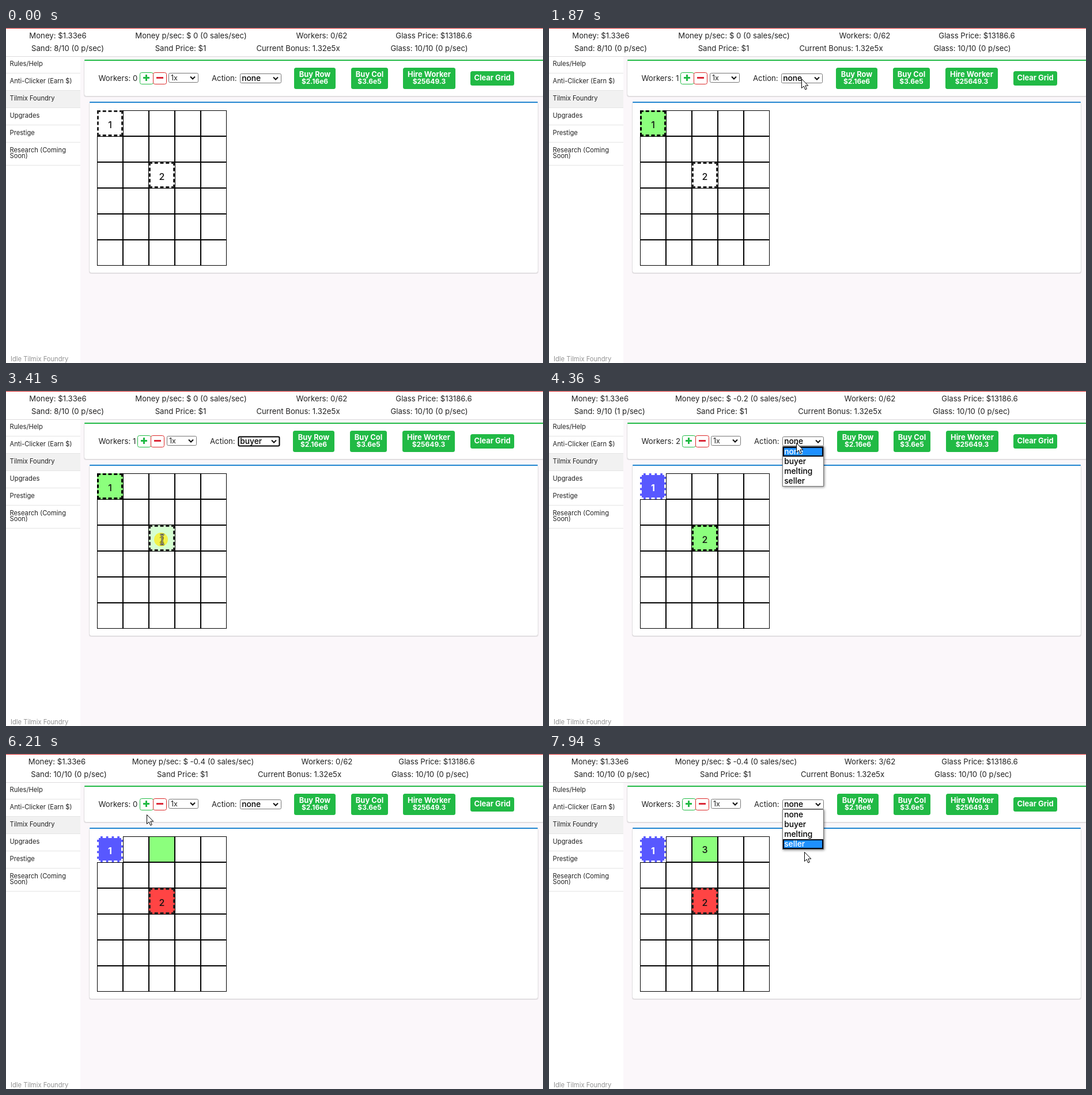
Animation of 932x582 px, one loop 8 s. Source, as an HTML page:

```html
<!DOCTYPE html>
<html lang="en">
<head>
<meta charset="utf-8">
<title>Idle Tilmix Foundry</title>
<style>
  html, body { margin: 0; width: 100%; height: 100%; overflow: hidden; background: #fbf7fa; }
  svg { position: absolute; left: 0; top: 0; }
  text { font-family: Inter, "Open Sans", sans-serif; font-size: 13.2px; fill: #222; white-space: pre; }
  .side { font-size: 11.2px; }
  .btn { font-weight: 700; fill: #fff; font-size: 12.9px; }
  .cost { font-size: 12px; }
  .option { font-weight: 500; font-size: 13.8px; fill: #000; }
  .cell {
    position: absolute; box-sizing: border-box; width: 45px; height: 45px;
    border: 1px solid #000; background: #fff; color: #111; text-align: center;
    font: 500 16px/44px Inter, "Open Sans", sans-serif;
  }
  .fixed { border: 3px dashed #222; line-height: 45px; }
  .hover { background: #d6ffd1; }
  .picked { background: #8cff7d; border-color: #000; }
  .buyer { background: #5858ff; border-color: #fff; color: #fff; font-weight: 700; }
  .melting { background: #ff4444; }
</style>
</head>
<body>
<svg id="page" width="932" height="582"></svg>
<div id="grid"></div>
<svg id="top" width="932" height="582"></svg>
<script>
const NS = 'http://www.w3.org/2000/svg';
const page = document.getElementById('page');
const topLayer = document.getElementById('top');
const gridBox = document.getElementById('grid');

function set(el, attrs) {
  for (const k in attrs) el.setAttribute(k, attrs[k]);
  return el;
}
function add(parent, tag, attrs) {
  return parent.appendChild(set(document.createElementNS(NS, tag), attrs));
}
const rect = (p, x, y, width, height, fill, more) =>
  add(p, 'rect', { x, y, width, height, fill, ...more });
const frame = (p, x, y, w, h, stroke, more) =>
  rect(p, x + .5, y + .5, w - 1, h - 1, '#fff', { stroke, ...more });
const path = (p, d, stroke, width, fill = 'none') =>
  add(p, 'path', { d, stroke, 'stroke-width': width, fill });
function text(p, str, x, y, more) {
  const el = add(p, 'text', { x, y, ...more });
  el.textContent = str;
  return el;
}
const mid = { 'text-anchor': 'middle' };
const move = (el, x, y = 0) => el.setAttribute('transform', `translate(${x} ${y})`);
const show = (el, on) => { el.style.display = on ? '' : 'none'; };
const write = (el, str) => { if (el.textContent !== str) el.textContent = str; };

// Value of the last [time, value] step reached.
function at(steps, t) {
  let v = steps[0][1];
  for (const s of steps) if (t >= s[0]) v = s[1];
  return v;
}

// ---- Fixed page parts ----
rect(page, 0, 0, 932, 582, '#fbf7fa');
rect(page, 0, 0, 129, 582, '#fff');
rect(page, 0, 0, 932, 49, '#fff');
rect(page, 0, 49, 932, 1, '#dcdadc');
rect(page, 0, 0, 932, 1, '#db2828');

rect(page, 0, 108, 129, 30, '#f1f1f1');
for (const y of [78, 108, 138, 168, 198, 238]) rect(page, 0, y, 129, 1, '#e4e4e4');
[['Rules/Help', 66], ['Anti-Clicker (Earn $)', 96], ['Tilmix Foundry', 126], ['Upgrades', 156],
 ['Prestige', 186], ['Research (Coming', 216], ['Soon)', 226]]
  .forEach(([s, y]) => text(page, s, 6.5, y, { class: 'side' }));
text(page, 'Idle Tilmix Foundry', 8, 579, { class: 'side', style: 'fill:#929292' });

function panel(x, y, w, h, color) {
  rect(page, x, y + 2, w, h - 1, '#e3dfe2', { rx: 4 });
  frame(page, x, y, w, h, '#dedcde', { rx: 4 });
  rect(page, x + 1, y, w - 2, 2, color, { rx: 1 });
}
panel(135, 55, 800, 64, '#21ba45');
panel(144, 128, 780, 298, '#2185d0');

// ---- Header counters ----
const rowA = ['Money: $1.33e6', '', '', 'Glass Price: $13186.6'].map(s => text(page, s, 0, 18, mid));
const rowB = ['', 'Sand Price: $1', 'Current Bonus: 1.32e5x', 'Glass: 10/10 (0 p/sec)']
  .map(s => text(page, s, 0, 40, mid));

// ---- Toolbar ----
const label = text(page, '', 160.5, 92);

function chevron(p, x, y) {
  path(p, `M${x - 4} ${y - 2}l4 4l4 -4`, '#111', 2);
}
const plusMinus = add(page, 'g', {});
frame(plusMinus, 0, 77, 24, 21, '#21ba45', { rx: 3 });
frame(plusMinus, 23, 77, 24, 21, '#db2828', { rx: 3 });
path(plusMinus, 'M6 86.5h11M11.5 81v11', '#21ba45', 3);
path(plusMinus, 'M29 86.5h12', '#db2838', 3);

const amount = add(page, 'g', {});
frame(amount, 0, 78, 52, 17, '#767676', { rx: 2 });
text(amount, '1x', 4, 91, { style: 'font-size:12.5px' });
chevron(amount, 42, 86.5);

const actionLabel = text(page, 'Action:', 0, 92);
const select = add(page, 'g', {});
const selectBox = frame(select, 0, 79, 72, 17, '#767676', { rx: 2 });
const selectText = text(select, '', 3.2, 92, { class: 'option' });
chevron(select, 62, 87.5);

function button(base, pull, w, y, h, lines) {
  const g = add(page, 'g', {});
  rect(g, 0, y, w, h, '#21ba45', { rx: 3.5 });
  lines.forEach((s, i) => text(g, s, w / 2, y + 16 + i * 12, { ...mid, class: i ? 'btn cost' : 'btn' }));
  return { g, base, pull };
}
const parts = [
  { g: plusMinus, base: 231.8, pull: 1 },
  { g: amount, base: 282, pull: 1 },
  { g: actionLabel, base: 357, pull: 1 },
  { g: select, base: 406, pull: 1 },
  button(500.4, .6, 72, 69, 37, ['Buy Row', '$2.16e6']),
  button(598.9, .5, 64, 69, 37, ['Buy Col', '$3.6e5']),
  button(689, .35, 91, 69, 37, ['Hire Worker', '$25649.3']),
  button(806, 0, 76, 75, 25, ['Clear Grid'])
];

// ---- Grid ----
const cells = [];
for (let i = 0; i < 30; i++) {
  const el = document.createElement('div');
  el.style.left = 158 + i % 5 * 45 + 'px';
  el.style.top = 143 + Math.floor(i / 5) * 45 + 'px';
  cells.push(gridBox.appendChild(el));
}
const ONE = 0, TWO = 12, THREE = 2;
cells[ONE].textContent = '1';
cells[TWO].textContent = '2';

// ---- Drop-down list ----
const menu = add(topLayer, 'g', {});
frame(menu, 0, 96, 72, 70, '#767676', { style: 'filter:drop-shadow(1px 1px 2px rgba(0,0,0,.5))' });
const mark = rect(menu, 2, 0, 68, 15, '#1e90ff', { stroke: '#000814', 'stroke-width': 2 });
const items = ['none', 'buyer', 'melting', 'seller']
  .map((s, i) => text(menu, s, 3.2, 110 + i * 17, { class: 'option' }));

// ---- Pointer ----
const halo = add(topLayer, 'circle', { r: 12, fill: 'rgba(255,235,0,.65)' });
const arrow = path(topLayer, 'M.5 .5V16.5L4.2 13L6.8 19L9.3 17.9L6.8 12.1H11.8Z', '#000', 1, '#fff');
const beam = add(topLayer, 'g', {});
const beamLine = 'M-3.5 -8.5H-1L0 -7.5L1 -8.5H3.5M0 -7.5V7.5M-3.5 8.5H-1L0 7.5L1 8.5H3.5';
path(beam, beamLine, '#333', 3);
path(beam, beamLine, '#e8e8a0', 1);
const hand = add(topLayer, 'g', {});
path(hand, 'M-1.7 2a1.8 1.8 0 0 1 3.6 0v6q2 -1 3 .6q2 -.8 3 .9q2.6 -.6 2.6 2v5q0 3 -2 7h-8.5' +
  'q-1 -3 -4 -7.5q-2 -2.8 -.2 -3.6q1.2 -.4 2.5 1.6z', '#000', 1.2, '#fff');
path(hand, 'M1.9 8v4M4.9 8.6v3.5M7.9 9.5v3', '#000', 1);

// ---- Timeline ----
const LOOP = 8000;
const track = [
  [70, 762, 516], [870, 184, 168], [1300, 184, 168], [1870, 438, 88], [2050, 438, 88],
  [2390, 441, 104], [2570, 441, 104], [2630, 444, 115], [2760, 445, 117], [3320, 271, 258],
  [3470, 271, 258], [4190, 429, 90], [4370, 429, 90], [4560, 436, 138], [4770, 436, 138],
  [5480, 249, 165], [5530, 249, 167], [5640, 249, 167], [6340, 243, 99], [6370, 243, 99],
  [6390, 244, 97], [6560, 244, 97], [7030, 244, 94], [7180, 244, 94], [7360, 438, 84],
  [7560, 438, 84], [7940, 443, 170]
];
const clicks = [1230, 2050, 2690, 3390, 4220, 4730, 5560, 6560, 6750, 6920, 7540];
const workers = [[0, 0], [1290, 1], [3450, 2], [5620, 0], [6600, 1], [6790, 2], [6960, 3]];
const picked = [[0, -1], [1290, ONE], [3450, TWO], [5620, THREE]];
const action = [[0, 'none'], [2720, 'buyer'], [3450, 'none'], [4760, 'melting'], [5620, 'none']];
const open = [[0, false], [2080, true], [2720, false], [4250, true], [4760, false], [7570, true]];
const income = [[0, '0'], [3450, '-0.2'], [4390, '-0.4']];
const sand = [[0, ['8/10 (0', 0]], [3450, ['8/10 (1', -3]], [4220, ['9/10 (1', -3]],
              [5060, ['10/10 (1', 1]], [5530, ['10/10 (0', 3.4]]];

function pointer(t) {
  let i = 0;
  while (i < track.length - 1 && t >= track[i + 1][0]) i++;
  const a = track[i], b = track[i + 1];
  if (!b || t < a[0]) return [a[1], a[2]];
  const u = (t - a[0]) / (b[0] - a[0]);
  const e = u * u * (3 - 2 * u);
  return [a[1] + (b[1] - a[1]) * e, a[2] + (b[2] - a[2]) * e];
}

function drawHeader(t) {
  const late = t >= 3450;
  const hired = t >= 6600 ? at(workers, t) : 0;
  write(rowA[1], `Money p/sec: $ ${at(income, t)} (0 sales/sec)`);
  write(rowA[2], `Workers: ${hired}/62`);
  const xs = late ? [88.5, 324.5, 557, 747.5] : [90, 321, 548, 742.5];
  rowA.forEach((el, i) => el.setAttribute('x', xs[i]));
  const [amountText, shift] = at(sand, t);
  write(rowB[0], `Sand: ${amountText} p/sec)`);
  const pull = [.6, 1, .75, .5];
  [107, 303, 507, 734.5].forEach((x, i) => rowB[i].setAttribute('x', x + shift * pull[i]));
}

function drawToolbar(t, y) {
  const n = at(workers, t);
  const shift = [0, -3.4, -1, -1][n];
  write(label, 'Workers: ' + n);
  for (const p of parts) move(p.g, Math.round(p.base + shift * p.pull));

  const value = at(action, t), focus = value !== 'none';
  write(selectText, value);
  set(selectBox, { stroke: focus ? '#000' : '#767676', 'stroke-width': focus ? 2 : 1 });

  const isOpen = at(open, t);
  show(menu, isOpen);
  if (!isOpen) return;
  move(menu, Math.round(406 + shift));
  const row = Math.max(0, Math.min(3, Math.floor((y - 97) / 17)));
  mark.setAttribute('y', 98 + row * 17);
  items.forEach((el, i) => { el.style.fill = i === row ? '#fff' : '#000'; });
}

function drawGrid(t, x, y) {
  const col = Math.floor((x - 158) / 45), row = Math.floor((y - 143) / 45);
  const inside = t >= 70 && col >= 0 && col < 5 && row >= 0 && row < 6;
  const hover = inside ? row * 5 + col : -1;
  const chosen = at(picked, t);
  cells.forEach((el, i) => {
    let name = 'cell';
    if (i === ONE || i === TWO) name += ' fixed';
    if (i === chosen) name += ' picked';
    else if (i === ONE && t >= 3450) name += ' buyer';
    else if (i === TWO && t >= 5620) name += ' melting';
    else if (i === hover) name += ' hover';
    if (el.className !== name) el.className = name;
  });
  write(cells[THREE], t >= 6600 ? String(at(workers, t)) : '');
}

function drawPointer(t, x, y) {
  const near = (cx, cy) => Math.abs(x - cx) < 10 && Math.abs(y - cy) < 11;
  const onText = near(180, 167) || near(270, 257);
  const onButton = x > 232 && x < 279 && y > 77 && y < 100;
  const shape = t < 70 ? null : onText ? beam : onButton ? hand : arrow;
  for (const el of [arrow, beam, hand]) show(el, el === shape);
  if (shape) move(shape, Math.round(x), Math.round(y));
  show(halo, clicks.some(c => t >= c && t < c + 90));
  move(halo, Math.round(x) - 2, Math.round(y));
}

function draw(now) {
  const t = now % LOOP;
  const [x, y] = pointer(t);
  drawHeader(t);
  drawToolbar(t, y);
  drawGrid(t, x, y);
  drawPointer(t, x, y);
}

const start = performance.now();
function tick() {
  draw(performance.now() - start);
  requestAnimationFrame(tick);
}
tick();
</script>
</body>
</html>
```
